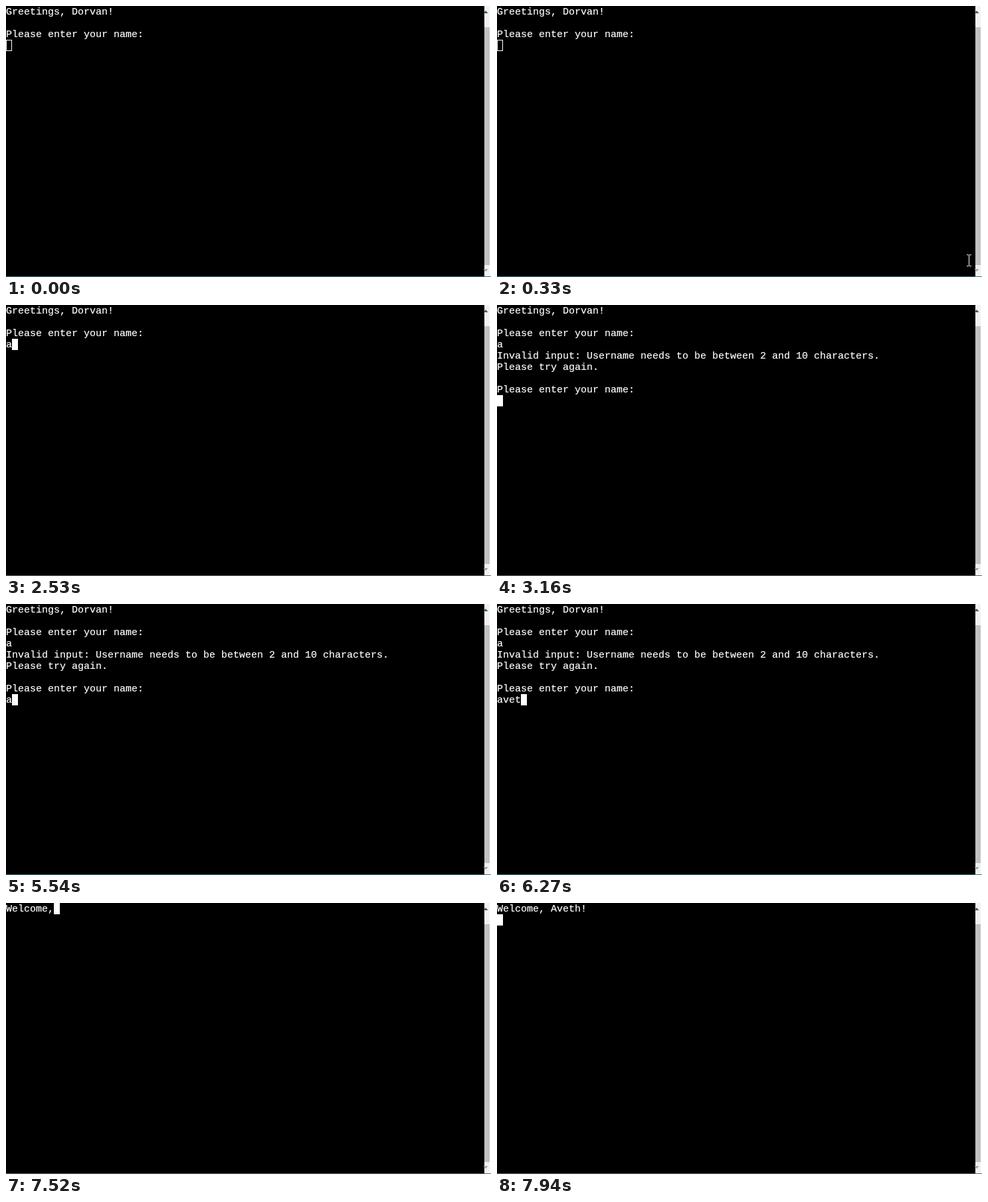
An HTML page for the animation above (8000 ms loop, 730 px wide and 409 px high).

```html
<!DOCTYPE html>
<html lang="en">
<head>
<meta charset="utf-8">
<title>Terminal</title>
<style>
  html, body { margin: 0; width: 100%; height: 100%; overflow: hidden; background: #fff; }
  #stage { position: relative; width: 730px; height: 409px; overflow: hidden; background: #fff; }
  #stage > * { position: absolute; }
  #screen {
    left: 0; top: 0; width: 720px; height: 408px; margin: 0; padding-top: 1px;
    box-sizing: border-box; background: #000; color: #fff;
    font: 15px/17px "Liberation Mono", "Courier New", monospace;
    -webkit-text-stroke: .2px #fff;
    white-space: pre; overflow: hidden;
  }
  #caret { left: 0; top: 0; width: 9px; height: 17px; box-sizing: border-box; border: 1px solid #fff; }
  #caret.focus { background: #fff; }
  #chrome { left: 0; top: 0; }
  #pointer { left: 0; top: 0; visibility: hidden; }
</style>
</head>
<body>
<div id="stage">
  <pre id="screen"></pre>
  <div id="caret"></div>
  <svg id="chrome" width="730" height="409">
    <rect x="720" width="8" height="408" fill="#f1f1f1"/>
    <rect x="720" y="32" width="8" height="359" fill="#c1c1c1"/>
    <rect y="408" width="730" height="1" fill="#4a6a78"/>
    <path d="M718.5 11l3.5-4 3.5 4z" fill="#3a5866"/>
    <path d="M718.5 397h7l-3.5 4z" fill="#a3a3a3"/>
  </svg>
  <svg id="pointer" width="9" height="18" shape-rendering="crispEdges">
    <path d="M1 .5h3M5 .5h3M4.5 1v16M1 17.5h3M5 17.5h3" fill="none" stroke="#fff"/>
  </svg>
</div>
<script>
  const LOOP = 8000, CELL = 9, ROW = 17, FOCUS = 730;
  const [screen, caret, pointer] = ["screen", "caret", "pointer"].map(id => document.getElementById(id));

  const prompt = "Please enter your name:\n";
  const first = "Greetings, Dorvan!\n\n" + prompt;
  const second = first + "a\nInvalid input: Username needs to be between 2 and 10 characters.\n" +
    "Please try again.\n\n" + prompt;
  const name = "aveth";
  const welcome = "Welcome, Aveth!\n";

  // [start time, terminal contents]
  const steps = [
    [0, first], [2530, first + "a"], [3090, first + "a\n"], [3160, second],
    ...[5540, 5810, 6070, 6270, 6470].map((t, i) => [t, second + name.slice(0, i + 1)]),
    [7270, second + name + "\n"],
    ...[[7330, 1], [7390, 3], [7450, 5], [7520, 8], [7650, 10], [7710, 12], [7790, 14], [7860, 15], [7940, 16]]
      .map(([t, n]) => [t, welcome.slice(0, n)])
  ];

  // [start time, x, y]; no position means hidden
  const moves = [
    [0], [130, 697, 400], [200, 701, 391], [260, 704, 382], [330, 706, 375],
    [800, 706, 381], [880]
  ];

  const at = (list, t) => list.findLast(item => item[0] <= t);
  const place = (el, x, y) => { el.style.transform = `translate(${x}px, ${y}px)`; };

  function draw(t) {
    const text = at(steps, t)[1];
    if (screen.textContent !== text) screen.textContent = text;
    const lines = text.split("\n");
    place(caret, lines.at(-1).length * CELL, (lines.length - 1) * ROW);
    caret.classList.toggle("focus", t >= FOCUS);

    const [, x, y] = at(moves, t);
    pointer.style.visibility = x === undefined ? "hidden" : "visible";
    if (x !== undefined) place(pointer, x, y);
  }

  const start = performance.now();
  function frame() {
    draw((performance.now() - start) % LOOP);
    requestAnimationFrame(frame);
  }
  frame();
</script>
</body>
</html>
```
